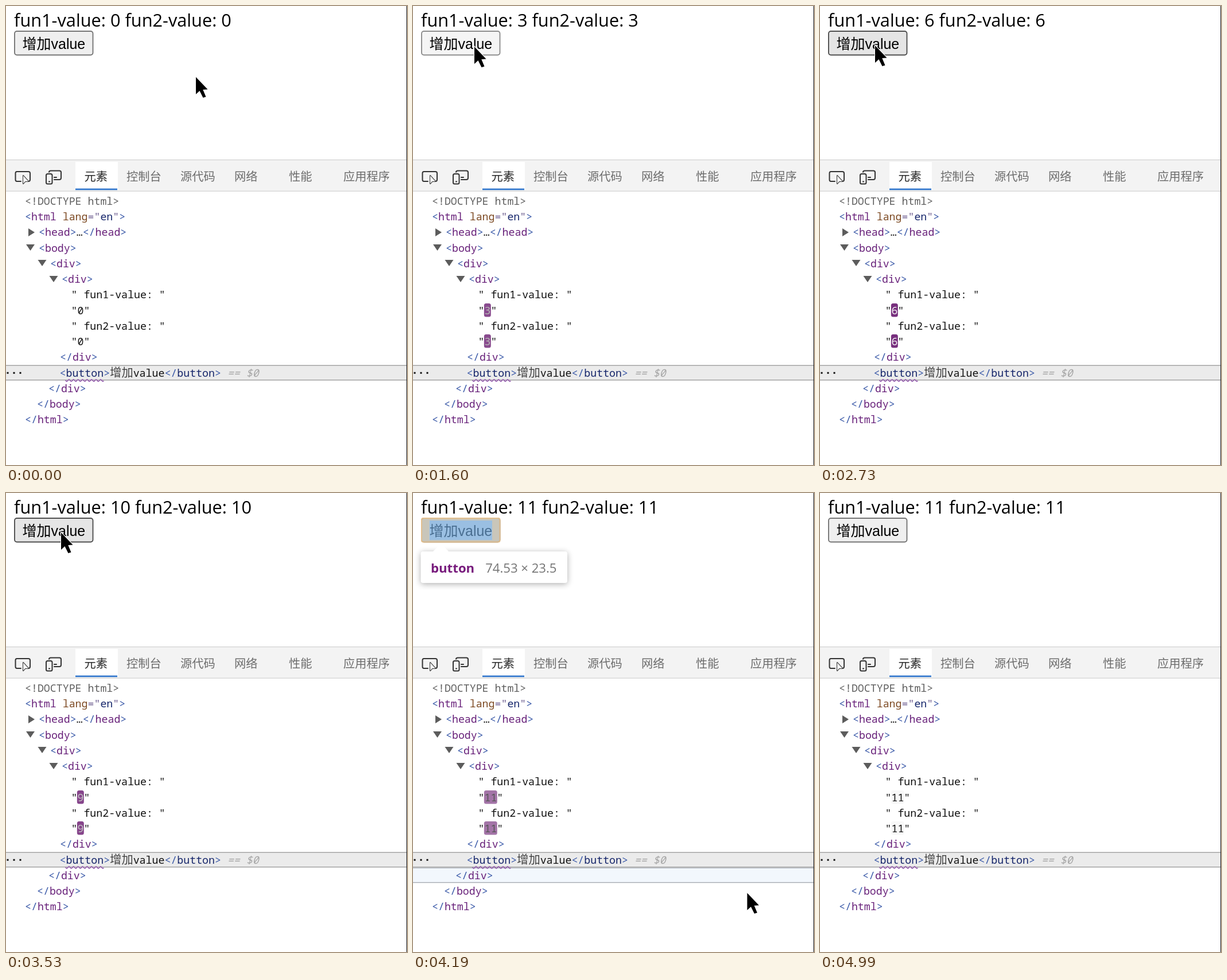
Write an HTML page with a canvas that moves like this. It is 699 px wide and 801 px high and loops after 5040 ms.

```html
<!DOCTYPE html>
<html lang="zh-CN">
<head>
<meta charset="utf-8">
<style>
html, body { margin: 0; width: 100%; height: 100%; overflow: hidden; background: #fff; }
canvas { display: block; }
</style>
</head>
<body>
<canvas id="stage" width="699" height="801"></canvas>
<script>
const ctx = document.getElementById('stage').getContext('2d');
const LOOP = 5040, DOM_LAG = 70, FADE = 1120, FADE_END = 1400;
const CJK = '"Noto Sans CJK SC", "Noto Sans CJK", sans-serif';
const PAGE = '30.7px "Open Sans", "Noto Sans", sans-serif';
const BUTTON = '25px "Liberation Sans", ' + CJK;
const TABS = '20.3px ' + CJK;
const MONO = '18.25px "Noto Sans Mono", monospace';
const MONO_CJK = '20.3px ' + CJK;
const BLUE = '#3a59a8', PURPLE = '#68217a', NAVY = '#16266b';
const ROW_TOP = 326.4, ROW = 27.27;

// Moments at which the counter goes up by one.
const CLICKS = [800, 1050, 1360, 1640, 1890, 2640, 2880, 3110, 3320, 3510, 3720];

// Pointer stops: time, x, y.
const PATH = [
  [50, 331, 123], [380, 107, 70], [1920, 107, 70], [2160, 198, 134], [2250, 198, 134],
  [2500, 96, 68], [3780, 96, 68], [3880, 200, 190], [3980, 370, 400],
  [4090, 500, 578], [4140, 545, 642], [4190, 582, 696], [4310, 645, 825]
];

const mix = (a, b, p) => a + (b - a) * p;
const clamp = p => Math.max(0, Math.min(1, p));
const rgb = (from, to, p) => `rgb(${from.map((v, i) => Math.round(mix(v, to[i], p)))})`;

function pointer(t) {
  const next = PATH.findIndex(stop => stop[0] > t);
  if (next === 0) return { x: PATH[0][1], y: PATH[0][2] };
  if (next < 0) return { x: 700, y: 900 };
  const [a, b] = [PATH[next - 1], PATH[next]];
  let p = (t - a[0]) / (b[0] - a[0]);
  if (b[0] < 2600) p = p * p * (3 - 2 * p);
  return { x: mix(a[1], b[1], p), y: mix(a[2], b[2], p) };
}

const countAt = t => CLICKS.filter(c => c <= t).length;
const rowAt = y => y < ROW_TOP || y > 801 ? -1 : Math.floor((y - ROW_TOP) / ROW);

function text(str, x, y, font, color) {
  ctx.font = font;
  ctx.fillStyle = color;
  ctx.fillText(str, x, y);
  return x + ctx.measureText(str).width;
}

function runs(x, y, ...parts) {
  for (const [str, color, font = MONO] of parts) x = text(str, x, y, font, color);
  return x;
}

function rect(x, y, w, h, color) {
  ctx.fillStyle = color;
  ctx.fillRect(x, y, w, h);
}

function round(x, y, w, h, r, fill, stroke, width = 1) {
  ctx.beginPath();
  ctx.roundRect(x, y, w, h, r);
  if (fill) { ctx.fillStyle = fill; ctx.fill(); }
  if (stroke) { ctx.strokeStyle = stroke; ctx.lineWidth = width; ctx.stroke(); }
}

function poly(points, fill, stroke, width) {
  ctx.beginPath();
  points.forEach(([x, y]) => ctx.lineTo(x, y));
  ctx.closePath();
  if (stroke) { ctx.strokeStyle = stroke; ctx.lineWidth = width; ctx.stroke(); }
  if (fill) { ctx.fillStyle = fill; ctx.fill(); }
}

function drawPage(t, mouse) {
  const n = countAt(t);
  text(`fun1-value: ${n} fun2-value: ${n}`, 14, 35.5, PAGE, '#000');
  const hover = mouse.x > 14 && mouse.x < 152 && mouse.y > 43 && mouse.y < 86;
  const pressed = hover && CLICKS.some(c => t >= c - 70 && t < c);
  const fill = pressed ? '#f5f5f5' : hover ? '#e5e5e5' : '#efefef';
  const edge = pressed ? '#8d8d8d' : hover ? '#4f4f4f' : '#767676';
  round(15, 44, 136.5, 41.5, 4, fill, edge, 1.9);
  text('增加value', 28.5, 75, BUTTON, '#000');
}

function drawToolbar() {
  rect(0, 268, 698, 56, '#f3f3f3');
  rect(0, 268, 698, 1, '#cbcbcb');
  rect(0, 322.5, 698, 1.2, '#d4d4d4');
  rect(121, 272, 74, 49, '#fff');
  rect(121, 318.5, 73, 2.7, '#3176cc');
  text('元素', 136.5, 305, TABS, '#262626');
  [['控制台', 210], ['源代码', 304], ['网络', 398], ['性能', 493], ['应用程序', 588]]
    .forEach(([label, x]) => text(label, x, 305, TABS, '#6c6c6c'));

  const ink = '#333';
  ctx.strokeStyle = ink;
  ctx.lineWidth = 2;
  ctx.lineJoin = ctx.lineCap = 'round';
  ctx.beginPath();
  ctx.moveTo(26, 306);
  ctx.lineTo(19, 306);
  ctx.quadraticCurveTo(16.5, 306, 16.5, 303);
  ctx.lineTo(16.5, 292);
  ctx.quadraticCurveTo(16.5, 289, 19, 289);
  ctx.lineTo(39, 289);
  ctx.quadraticCurveTo(42, 289, 42, 292);
  ctx.lineTo(42, 303);
  ctx.quadraticCurveTo(42, 306, 39, 306);
  ctx.stroke();
  poly([[30, 296], [30, 310], [33.5, 306], [39, 306]], '#f3f3f3', ink, 2);

  ctx.beginPath();
  ctx.moveTo(75, 290);
  ctx.quadraticCurveTo(75, 287.5, 78, 287.5);
  ctx.lineTo(93, 287.5);
  ctx.quadraticCurveTo(96, 287.5, 96, 290);
  ctx.lineTo(96, 300);
  ctx.quadraticCurveTo(96, 303, 93, 303);
  ctx.lineTo(84, 303);
  ctx.moveTo(84, 299);
  ctx.lineTo(88, 299);
  ctx.stroke();
  round(70, 293, 10.5, 17.5, 2.5, '#f3f3f3', ink, 2);
  rect(74, 305.5, 3, 1.8, ink);
}

function drawValue(y, t) {
  const n = countAt(t - DOM_LAG);
  let x = text('"', 113.5, y, MONO, '#111');
  let color = '#111';
  if (n) {
    const age = t - DOM_LAG - CLICKS[n - 1];
    const p = clamp(age / FADE);
    ctx.font = MONO;
    ctx.globalAlpha = 1 - clamp((age - FADE) / (FADE_END - FADE));
    round(x - .6, y - 19, ctx.measureText(n).width + 1, 23.5, 3.5,
      rgb([118, 44, 124], [245, 245, 245], p));
    ctx.globalAlpha = 1;
    color = rgb([255, 255, 255], [17, 17, 17], clamp(p * 2));
  }
  x = text(String(n), x, y, MONO, color);
  text('"', x, y, MONO, '#111');
}

function drawRowBand(row, fill, edge) {
  const y = Math.floor(ROW_TOP + row * ROW) + .6;
  rect(0, y, 698, 26.8, fill);
  rect(0, y, 698, 1.4, edge);
  rect(0, y + 25.4, 698, 1.4, edge);
}

function drawTree(t) {
  const base = row => Math.round(346.7 + row * ROW);
  const tag = (row, x, name, close) =>
    runs(x, base(row), [close ? '</' : '<', BLUE], [name, PURPLE], ['>', BLUE]);
  const down = (x, y) => poly([[x, y], [x + 15, y], [x + 7.5, y + 11]], '#5c5c5c');

  const hovered = rowAt(pointer(t - 25).y);
  if (hovered >= 0 && hovered < 15 && hovered !== 11) drawRowBand(hovered, '#f2f7fd', '#a9adb3');
  drawRowBand(11, '#ebebeb', '#a0a0a0');

  text('<!DOCTYPE html>', 33, base(0), MONO, '#606060');
  runs(33, base(1), ['<', BLUE], ['html', PURPLE], [' lang', '#7d4a23'],
    ['="', '#68588c'], ['en', NAVY], ['"', '#68588c'], ['>', BLUE]);
  poly([[39, 388], [50, 395], [39, 402]], '#5c5c5c');
  const x = tag(2, 57, 'head');
  tag(2, text('…', x, base(2), MONO, '#222'), 'head', true);
  down(35, 416);
  tag(3, 57, 'body');
  down(55.5, 443);
  tag(4, 77, 'div');
  down(75.5, 471);
  tag(5, 97, 'div');
  text('" fun1-value: "', 113.5, base(6), MONO, '#111');
  drawValue(base(7), t);
  text('" fun2-value: "', 113.5, base(8), MONO, '#111');
  drawValue(base(9), t);
  tag(10, 94, 'div', true);
  runs(93.5, base(11), ['<', BLUE], ['button', NAVY], ['>', BLUE], ['增加', '#444', MONO_CJK],
    ['value', '#111'], ['</', BLUE], ['button', NAVY], ['>', BLUE],
    [' == $0', '#a5a5a5', 'italic ' + MONO]);
  tag(12, 74, 'div', true);
  tag(13, 54, 'body', true);
  tag(14, 33, 'html', true);

  for (const dot of [3, 14, 25]) rect(dot - 1.5, 638.8, 3, 3, '#111');
  ctx.beginPath();
  for (let i = 0; i <= 66; i++) ctx.lineTo(104 + i, 653.5 + 1.7 * Math.sin(i * .8));
  ctx.strokeStyle = '#9256ad';
  ctx.lineWidth = 1.5;
  ctx.stroke();
}

function drawTooltip(name, size) {
  const bold = 'bold 22.2px "Open Sans", "Noto Sans", sans-serif';
  const plain = '22.1px "Open Sans", "Noto Sans", sans-serif';
  ctx.font = bold;
  const sizeX = 31 + ctx.measureText(name).width + 19;
  ctx.font = plain;
  const width = sizeX + ctx.measureText(size).width + 18 - 13;
  ctx.save();
  ctx.shadowColor = 'rgba(0,0,0,.32)';
  ctx.shadowBlur = 11;
  ctx.shadowOffsetY = 2;
  round(13.5, 102, width, 55, 4, '#fff');
  ctx.restore();
  poly([[34, 103], [49, 88], [63, 103]], '#fff');
  text(name, 31, 139, bold, '#781c7d');
  text(size, sizeX, 139, plain, '#747474');
}

function drawOverlay(t) {
  const row = rowAt(pointer(t - 50).y);
  const content = 'rgba(111,168,220,.66)';
  const margin = 'rgba(246,178,107,.6)';
  if (row === 11) {
    rect(28.5, 48, 109.5, 34, content);
    ctx.beginPath();
    ctx.rect(16, 45, 134.5, 39.5);
    ctx.rect(28.5, 48, 109.5, 34);
    ctx.fillStyle = 'rgba(186,182,164,.7)';
    ctx.fill('evenodd');
    round(15, 44, 136.5, 41.5, 3, null, '#e3bf8d', 2);
    drawTooltip('button', '74.53 × 23.5');
  } else if ([4, 5, 10, 12].includes(row)) {
    const outer = row === 4 || row === 12;
    rect(14, 4, 671, outer ? 82 : 39, content);
    drawTooltip('div', outer ? '362.5 × 44.5' : '362.5 × 21');
  } else if (row >= 6 && row <= 9) {
    rect(14, 4, 412, 39, content);
    drawTooltip('#text', '222.5 × 21');
  } else if ([1, 3, 13, 14].includes(row)) {
    const body = row === 3 || row === 13;
    if (body) {
      ctx.beginPath();
      ctx.rect(0, 0, 698, 100);
      ctx.rect(14, 4, 671, 82);
      ctx.fillStyle = margin;
      ctx.fill('evenodd');
      rect(14, 4, 671, 82, content);
    } else rect(0, 0, 698, 100, content);
    drawTooltip(body ? 'body' : 'html', body ? '362.5 × 44.5' : '377.5 × 54');
  }
}

function drawPointer({ x, y }) {
  const shape = [[0, 0], [0, 30], [6.5, 24], [12.5, 36], [17.5, 34.5], [12.3, 22], [20.5, 21.5]]
    .map(([dx, dy]) => [x + dx, y + dy + 1]);
  ctx.lineJoin = 'miter';
  poly(shape, '#000', '#fff', 2);
}

function draw(now) {
  const t = now % LOOP;
  const mouse = pointer(t);
  rect(0, 0, 699, 801, '#fff');
  drawPage(t, mouse);
  drawOverlay(t);
  drawToolbar();
  drawTree(t);
  rect(698, 0, 1, 801, '#20242b');
  drawPointer(mouse);
}

const start = performance.now();
function tick() {
  draw(performance.now() - start);
  requestAnimationFrame(tick);
}
tick();
</script>
</body>
</html>
```
